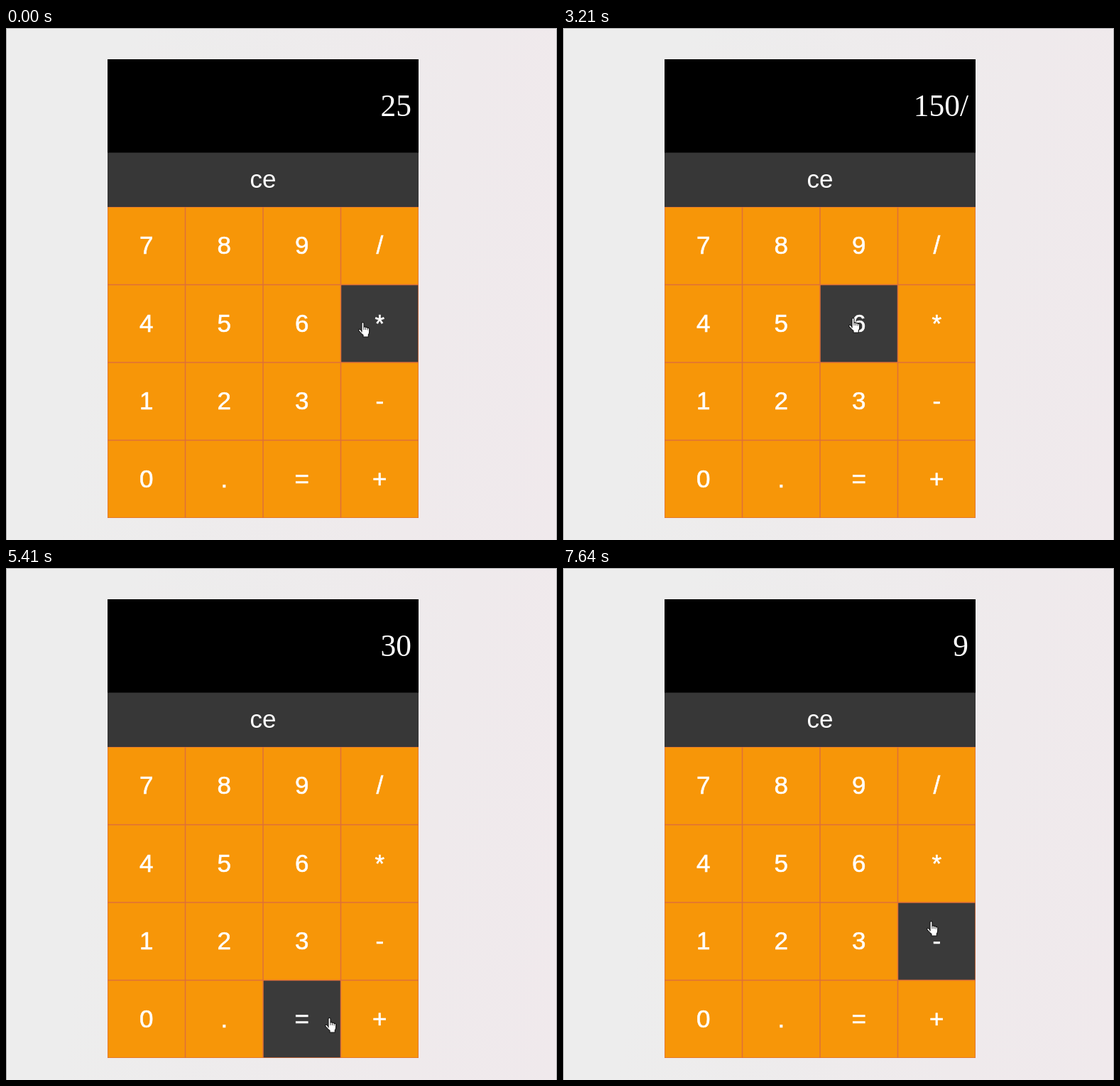
These frames come from a looping animation (776 px wide and 721 px high, 8 s). An HTML page:

```html
<!DOCTYPE html>
<html lang="en">
<head>
<meta charset="utf-8">
<title>Calculator</title>
<style>
  html, body { margin: 0; width: 100%; height: 100%; overflow: hidden; }
  body { background: linear-gradient(98deg, #ededed 20%, #efeaec 75%, #f0e9ec); }
  svg { display: block; position: absolute; inset: 0; }
  text { fill: #fff; font: 35px "Liberation Sans", Arial, sans-serif; text-anchor: middle; }
  #screen { font: 43.5px "Liberation Serif", "Times New Roman", serif; text-anchor: end; }
  #keys text { stroke: #fff; stroke-width: .6; }
  .key { fill: #f79608; }
  .key.hover { fill: #3a3a3a; }
  .frame { fill: none; stroke: #a9a9ab; }
  #hand { fill: #fff; stroke: #111; stroke-width: 1.1; stroke-linejoin: round; }
</style>
</head>
<body>
<svg width="776" height="721" viewBox="0 0 776 721">
  <path class="frame" d="M.5 721V.5H775.5V721"/>
  <rect x="143" y="44" width="438" height="132"/>
  <rect x="143" y="175.5" width="438" height="76.5" fill="#373737"/>
  <rect x="143" y="252" width="438" height="438" fill="#de6f38"/>
  <text id="screen" x="571" y="124"></text>
  <text x="362" y="225">ce</text>
  <g id="keys"></g>
  <g id="hand">
    <path d="M5 14V2Q5 .5 6.5 .5T8 2V7Q9.7 6 10.6 7.5Q12.2 6.8 13.2 8.4Q15.5 8 15.7 10V14Q15.7 16.5 14.3 18V21H7V18.5Q4 16 1.5 13Q0 11.4 1 10.5Q2.6 9.5 5 13Z"/>
    <path d="M8 7V11M10.6 7.7V11M13.2 8.6V11.5" fill="none" stroke-width=".8"/>
  </g>
</svg>
<script>
const LOOP = 8000;
const STEP = 145.9;      // the picture is refreshed once per step
const HOVER_LAG = .37;   // highlight trails the pointer, in steps
const LABELS = "789/456*123-0.=+";
const LEFT = 143, TOP = 252, PITCH = 109.5, BORDER = .75;
const FINGER = 6;        // fingertip offset inside the hand

// Pointer stops, timed in steps; stops without a press are passed through.
const stops = [
  { x: 496, y: 414, arrive: 0, press: 3, key: "*" },
  { x: 414, y: 415, arrive: 4, press: 6, key: "6" },
  { x: 438, y: 644, arrive: 10, press: 12, key: "=", leave: 16 },
  { x: 492, y: 308, arrive: 18, press: 21, key: "/" },
  { x: 402, y: 408, arrive: 22 },
  { x: 308, y: 414, arrive: 24, press: 25, key: "5" },
  { x: 474, y: 601, arrive: 28 },
  { x: 449, y: 633, arrive: 35, press: 35, key: "=", leave: 37 },
  { x: 345, y: 195, arrive: 41, press: 42, key: "ce", leave: 43 },
  { x: 413, y: 301, arrive: 45, press: 48, key: "9", leave: 49 },
  { x: 512, y: 497, arrive: 52 }
];

const byId = id => document.getElementById(id);

function add(parent, tag, attrs, content = "") {
  const node = document.createElementNS("http://www.w3.org/2000/svg", tag);
  for (const name in attrs) node.setAttribute(name, attrs[name]);
  node.textContent = content;
  return parent.appendChild(node);
}

const keys = [...LABELS].map((label, i) => {
  const x = LEFT + i % 4 * PITCH, y = TOP + Math.floor(i / 4) * PITCH;
  const size = PITCH - 2 * BORDER;
  const rect = add(byId("keys"), "rect", {
    class: "key", x: x + BORDER, y: y + BORDER, width: size, height: size
  });
  add(byId("keys"), "text", { x: x + PITCH / 2, y: y + 66 }, label);
  return rect;
});

function handAt(step) {
  const i = stops.findLastIndex(stop => stop.arrive <= step);
  const from = stops[Math.max(i, 0)];
  const to = stops[i + 1] ?? from;
  const leave = from.leave ?? from.press ?? from.arrive;
  const part = Math.max(0, (step - leave) / (to.arrive - leave || 1));
  if (to === from) return from;
  return { x: from.x + (to.x - from.x) * part, y: from.y + (to.y - from.y) * part };
}

function keyUnder({ x, y }) {
  const col = Math.floor((x + FINGER - LEFT) / PITCH);
  const row = Math.floor((y - TOP) / PITCH);
  return row < 0 ? -1 : row * 4 + col;
}

function evaluate(expression) {
  const [a, operator, b] = expression.split(/([*/])/);
  return String(operator === "*" ? a * b : a / b);
}

function pressKey(shown, key) {
  if (key === "ce") return "0";
  if (key === "=") return evaluate(shown);
  return shown === "0" ? key : shown + key;
}

function draw(now) {
  const step = Math.floor(now % LOOP / STEP);
  const hand = handAt(step);
  const hovered = keyUnder(handAt(Math.max(0, step - HOVER_LAG)));
  byId("screen").textContent = stops
    .filter(stop => stop.press <= step)
    .reduce((shown, stop) => pressKey(shown, stop.key), "25");
  keys.forEach((rect, i) => rect.classList.toggle("hover", i === hovered));
  byId("hand").setAttribute("transform", `translate(${hand.x} ${hand.y})`);
}

const begin = performance.now();
function tick() {
  draw(performance.now() - begin);
  requestAnimationFrame(tick);
}
tick();
</script>
</body>
</html>
```
